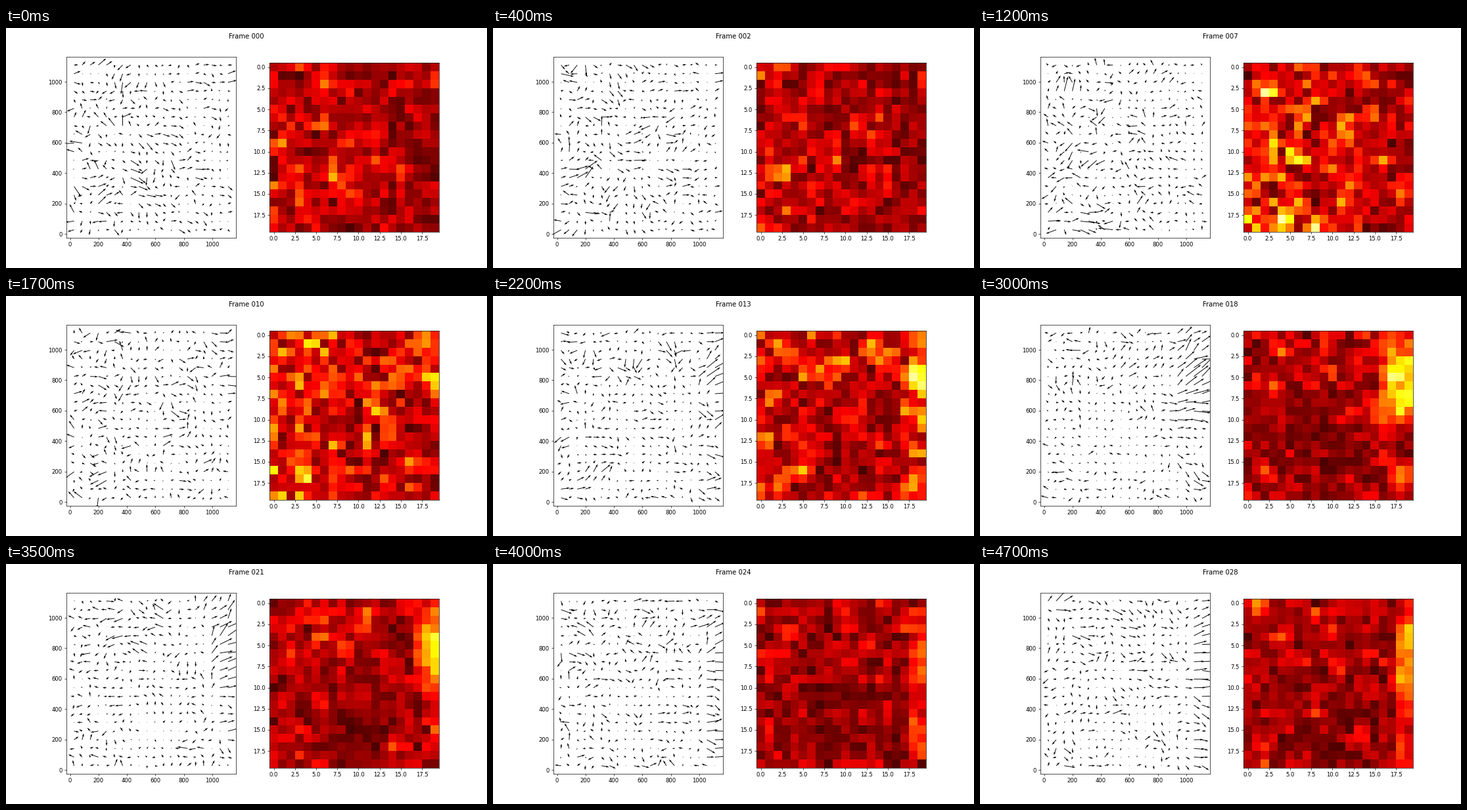
These frames come from a looping animation (732 px wide and 366 px high, 4.8 s). A matplotlib script:

```python
import numpy as np
import matplotlib.pyplot as plt
from matplotlib.animation import FuncAnimation

SIZE = 20        # vectors per side
STEPS = 29       # distinct measurements
FRAMES = 48
FLOOR = 0.09     # heat level of still fluid

row, col = np.mgrid[0:SIZE, 0:SIZE]


def pulse(x, centre, width):
    return np.exp(-((x - centre) / width) ** 2)


def smoothstep(x, start, end):
    t = np.clip((x - start) / (end - start), 0, 1)
    return t * t * (3 - 2 * t)


def turbulence(seed=12):
    """Yield unit-variance vector noise, correlated in space and time."""
    rng = np.random.default_rng(seed)
    field = None
    for _ in range(STEPS):
        raw = rng.normal(size=(2, SIZE, SIZE))
        near = sum(np.roll(raw, d, axis) for d in (-1, 1) for axis in (1, 2))
        fresh = raw + .4 * near
        fresh /= fresh.std()
        field = fresh if field is None else .5 * field + .866 * fresh
        yield field


def flow(n, noise):
    """Velocity components for one measurement, first row on top."""
    late = smoothstep(n, 8, 14)

    # lively on the left at first, calm in the middle later
    early_gain = 1 + .3 * np.cos(np.pi * col / SIZE)
    late_gain = 1 - .4 * pulse(np.hypot(col - 10, row - 13), 0, 7)
    gain = early_gain + late * (late_gain - early_gain)
    spread = .13 + .08 * pulse(n, 10, 5)
    u, v = spread * gain * noise
    swing = .05 * np.cos(.45 * n)
    u, v = 1.1 * u + swing, .9 * v - .7 * swing

    # jet that enters along the right side and widens for a moment
    edge = 17.4 - 1.8 * pulse(n, 18, 2.5)
    strength = late * (.42 + .13 * pulse(n, 18, 4))
    jet = strength / (1 + np.exp(2.5 * (edge - col)))
    jet = jet * (.35 + .65 * pulse(row, 5 + .1 * (n - 13), 5.5))
    angle = np.radians(np.clip(3 * (12 - row), -25, 25))
    return u + jet * np.cos(angle), v + jet * np.sin(angle)


flows = [flow(n, noise) for n, noise in enumerate(turbulence())]

fig, (left, right) = plt.subplots(1, 2, figsize=(12, 6), dpi=61)
fig.subplots_adjust(left=.1255, right=.9, bottom=.125, top=.88, wspace=.2)
title = fig.suptitle("Frame 000", fontsize=12, y=.977)

x = np.linspace(28, 1110, SIZE)
arrows = left.quiver(x, x[::-1], *flows[0], width=.0036)
heat = right.imshow(np.zeros((SIZE, SIZE)), cmap="hot", vmin=0, vmax=1)


def update(k):
    n = k * 3 // 5
    u, v = flows[n]
    speed = np.hypot(u, v)
    arrows.scale = 1.8 * SIZE * speed.mean()
    arrows.set_UVC(u, v)
    heat.set_data(FLOOR + speed)
    title.set_text(f"Frame {n:03d}")
    return arrows, heat, title


anim = FuncAnimation(fig, update, frames=FRAMES, interval=100, repeat=True)
plt.show()
```
